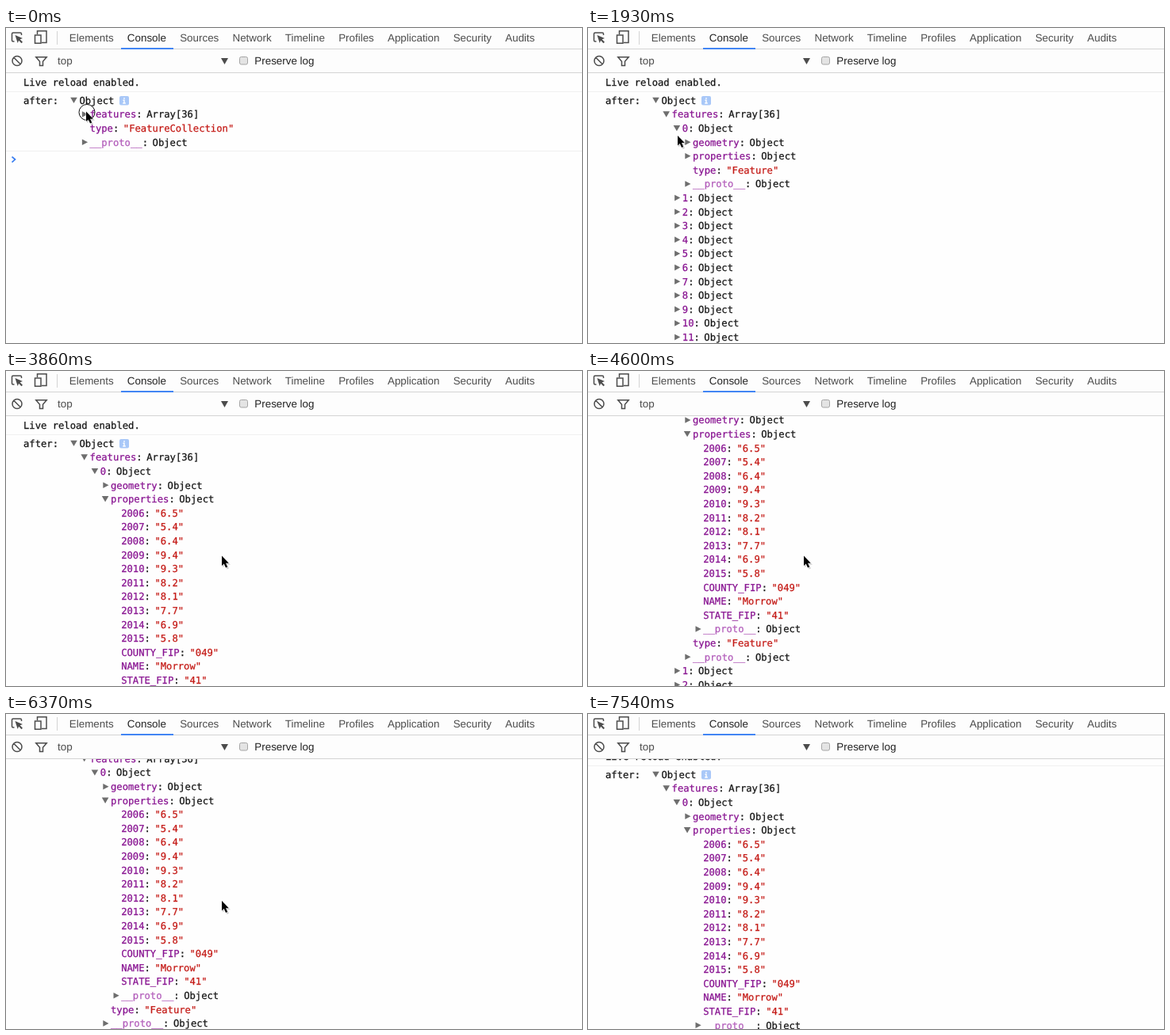
Recreate the animation shown at these times as an HTML page. Size 726 px wide and 398 px high, loop 8.44 s.

```html
<!DOCTYPE html>
<html lang="en">
<head>
<meta charset="utf-8">
<title>Console object tree</title>
<style>
  html, body { margin: 0; width: 100%; height: 100%; overflow: hidden; background: #fefefe; }
  svg { display: block; width: 726px; height: 398px; }
  text { text-rendering: geometricPrecision; white-space: pre; fill: currentColor; }
  .mono { font: 12.2px "DejaVu Sans Mono", monospace; color: #151515; stroke: currentColor; stroke-width: .25; }
  .ui { font: 13.4px "Liberation Sans", Arial, sans-serif; color: #4c4c4c; }
  .dark { color: #222; }
  .key { color: #881391; }
  .proto { color: #b25cba; }
  .string { color: #c41a16; }
  .tri { fill: #6e6e6e; }
  .icon { fill: none; stroke: #4c4c4c; stroke-width: 1.5; }
</style>
</head>
<body>
<svg id="stage" viewBox="0 0 726 398">
  <rect width="726" height="398" fill="#fefefe"/>
  <g id="log"></g>
  <g id="bar">
    <rect width="726" height="57" fill="#fdfdfd"/>
    <path d="M0 26.5H726M0 56.5H726M64.5 4V21" stroke="#d4d4d4"/>
    <rect x="145" y="25" width="66" height="2" fill="#4285f4"/>
    <path class="icon" d="M10.500 17H9Q7.500 17 7.500 15.500V7.500Q7.500 6 9 6H18Q19.500 6 19.500 7.500V9"/>
    <path d="M11.500 9L21 13L17.600 14.300L21 17.700L19.500 19.200L16.100 15.800L14.700 19Z" fill="#4c4c4c"/>
    <path class="icon" d="M39.500 8V3.700H51V18.500H45M36.500 9H44V19.300H36.500Z"/>
    <path class="icon" d="M20 41.500a6 6 0 1 0-12 0a6 6 0 1 0 12 0M9.800 37.300L18.200 45.700"/>
    <path class="icon" d="M37.800 36.700H51.200L46.500 42.300V47.500H42.500V42.300Z"/>
    <path d="M271 38H280L275.500 46Z" fill="#4c4c4c"/>
    <rect x="294.500" y="36.500" width="10" height="9.500" rx="2" fill="#e4e4e4" stroke="#a5a5a5"/>
  </g>
  <circle id="ring" r="10" fill="none" stroke="#111"/>
  <g id="cursor">
    <path d="M1 2V14.500L4 12L6.500 17L9 16L7 11.200H11Z" fill="#000" opacity=".18"/>
    <path d="M0 0V12.500L2.800 10L5 15L7.200 14L5 9.200H8.800Z" stroke="#fff" paint-order="stroke"/>
  </g>
</svg>
<script>
const LOOP = 8440, TICK = 148;
const PITCH = 17.6, INDENT = 13.2, CHAR = 7.345, GAP = 5.5;
const TOP = 91.4, LEFT = 92.4;
const $ = id => document.getElementById(id);

function add(parent, name, attrs, content) {
  const el = document.createElementNS("http://www.w3.org/2000/svg", name);
  for (const k in attrs) el.setAttribute(k, attrs[k]);
  if (content !== undefined) el.textContent = content;
  parent.append(el);
  return el;
}

const write = (g, x, mid, s, cls = "") =>
  add(g, "text", { x, y: mid + 4.3, class: "mono " + cls }, s);

function triangle(g, x, mid, open) {
  const d = open
    ? `M${x - 11.2} ${mid - 3.7}h8.6l-4.3 7.4z`
    : `M${x - 9.7} ${mid - 3.8}v7.6l7.2 -3.8z`;
  add(g, "path", { d, class: "tri" });
}

const rule = (g, y) => add(g, "rect", { y, width: 726, height: 1, fill: "#f0f0f0" });

// arrow: 1 open, 0 closed, undefined none
const row = (depth, key, value, arrow) => ({ depth, key, value, arrow });
const proto = depth => row(depth, "__proto__", "Object", 0);

const rates = "6.5 5.4 6.4 9.4 9.3 8.2 8.1 7.7 6.9 5.8".split(" ");
const fields = [
  ...rates.map((r, i) => [2006 + i, r]),
  ["COUNTY_FIP", "049"], ["NAME", "Morrow"], ["STATE_FIP", "41"]
].map(([k, v]) => row(4, String(k), `"${v}"`));

// Each level opens one more node of the tree
function treeRows(level) {
  const rows = [row(1, "features", "Array[36]", level > 0 ? 1 : 0)];
  if (level === 0) return [...rows, row(1, "type", '"FeatureCollection"'), proto(1)];
  for (let i = 0; i < 36; i++) {
    const open = i === 0 && level > 1;
    rows.push(row(2, String(i), "Object", open ? 1 : 0));
    if (!open) continue;
    rows.push(row(3, "geometry", "Object", 0));
    rows.push(row(3, "properties", "Object", level > 2 ? 1 : 0));
    if (level > 2) rows.push(...fields, proto(4));
    rows.push(row(3, "type", '"Feature"'), proto(3));
  }
  return rows;
}

function buildView(level) {
  const g = add($("log"), "g", {});
  write(g, 22, 69, "Live reload enabled.");
  rule(g, 80);
  write(g, 22, TOP, "after:");
  triangle(g, LEFT, TOP, true);
  write(g, LEFT, TOP, "Object");
  add(g, "rect", { x: 143, y: 86, width: 12, height: 11.5, rx: 2, fill: "#a9c8f8" });
  add(g, "path", { d: "M149 88v1.700M147.500 91.200h1.500v3.600M147.200 95h3.600", stroke: "#fff", "stroke-width": 1.4, fill: "none" });

  const rows = treeRows(level);
  rows.forEach((r, i) => {
    const mid = TOP + PITCH * (i + 1);
    const x = LEFT + INDENT * r.depth;
    const keyEnd = x + CHAR * r.key.length;
    if (r.arrow !== undefined) triangle(g, x, mid, r.arrow);
    write(g, x, mid, r.key, r.key === "__proto__" ? "proto" : "key");
    write(g, keyEnd, mid, ":");
    write(g, keyEnd + CHAR + GAP, mid, r.value, r.value[0] === '"' ? "string" : "");
  });

  const end = TOP + PITCH * rows.length + 11;
  rule(g, Math.round(end));
  add(g, "path", { d: `M7.500 ${end + 7.4}l4 3.500l-4 3.500`, fill: "none", stroke: "#367cf1", "stroke-width": 1.7 });
  return g;
}

const views = [0, 1, 2, 3].map(buildView);

const label = (x, y, s, cls = "") => add($("bar"), "text", { x, y, class: "ui " + cls }, s);
let tabX = 79.8;
for (const name of "Elements Console Sources Network Timeline Profiles Application Security Audits".split(" "))
  tabX += label(tabX, 17.3, name, name === "Console" ? "dark" : "").getComputedTextLength() + 17.2;
label(65, 46.2, "top");
label(313.3, 46.2, "Preserve log", "dark");

// Moves run between two ticks towards a goal, with a smooth start and end
const cursorMoves = [
  { from: 4, to: 7, goal: [109.5, 125] },
  { from: 12.4, to: 14.2, goal: [123, 167] },
  { from: 14.2, to: 15, goal: [122, 160] },
  { from: 22, to: 26, goal: [272, 233.5] },
  { from: 38, to: 39, goal: [272, 236] },
  { from: 48, to: 50, goal: [483, 351] }
];
const scrollMoves = [
  { from: 27, to: 32.2, goal: [95] },
  { from: 36, to: 37, goal: [93.8] },
  { from: 39.8, to: 46, goal: [15] }
];
const clicks = [{ down: 0, up: 3 }, { down: 9, up: 10 }, { down: 17, up: 20 }];
const EXIT = 51;

function smooth(tick, from, to) {
  const p = Math.min(1, Math.max(0, (tick - from) / (to - from)));
  return p * p * (3 - 2 * p);
}

const follow = (moves, start, tick) => moves.reduce((pos, m) =>
  pos.map((v, i) => v + (m.goal[i] - v) * smooth(tick, m.from, m.to)), start);

function draw(t) {
  const tick = Math.floor((t + 10) / TICK);
  const level = clicks.filter(c => tick > c.down).length;
  const press = clicks.find(c => tick >= c.down && tick < c.up);
  const [scroll] = follow(scrollMoves, [0], tick);
  const [x, y] = follow(cursorMoves, [101, 105.5], tick);

  views.forEach((v, i) => v.style.display = i === level ? "" : "none");
  $("log").setAttribute("transform", `translate(0 ${-scroll})`);
  $("cursor").setAttribute("transform", `translate(${x} ${y})`);
  $("cursor").setAttribute("opacity", tick < EXIT ? 1 : 0);
  $("ring").setAttribute("transform", `translate(${x + 1} ${y + 1})`);
  $("ring").setAttribute("opacity", press ? (press.up - tick) / (press.up - press.down) : 0);
}

const start = performance.now();
function frame() {
  draw((performance.now() - start) % LOOP);
  requestAnimationFrame(frame);
}
frame();
</script>
</body>
</html>
```
